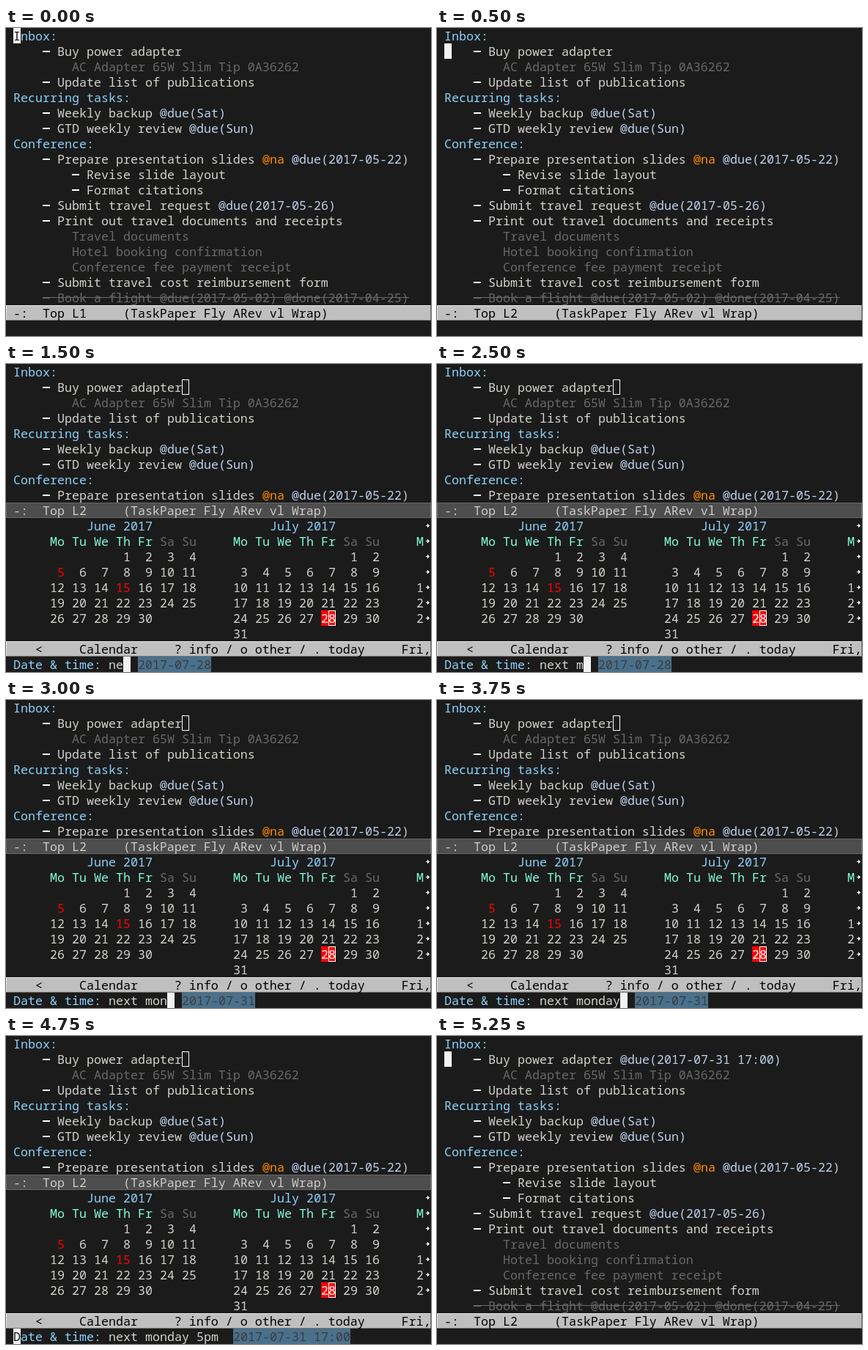
Write an HTML page with a canvas that moves like this. It is 580 by 420 pixels and loops after 5500 ms.

```html
<!DOCTYPE html>
<html lang="en">
<head>
<meta charset="utf-8">
<title>Task list with date prompt</title>
<style>
html, body { margin: 0; width: 100%; height: 100%; overflow: hidden; background: #1b1b1b; }
canvas { display: block; width: 580px; height: 420px; }
</style>
</head>
<body>
<canvas id="stage" width="580" height="420"></canvas>
<script>
const ctx = document.getElementById('stage').getContext('2d');
const W = 580, H = 420, CELL = 10, ROW = 21, LEFT = 10;
const STEP = 250, LOOP = 5500;
const C = {
  bg: '#1b1b1b', text: '#d3d2cb', head: '#8bd2fc', tag: '#bcd2ee', next: '#ff8c00',
  dim: '#696969', white: '#ffffff', cursor: '#f2f2f2', day: '#7fffd4', red: '#ff0000',
  hint: '#4a708b', hintText: '#393d40'
};
const TYPED = 'next monday 5pm';
const PROMPT = 'Date & time: ';

const TASKS = [
  ['head', 'Inbox:'],
  ['task', 'Buy power adapter'],
  ['note', 'AC Adapter 65W Slim Tip 0A36262'],
  ['task', 'Update list of publications'],
  ['head', 'Recurring tasks:'],
  ['task', 'Weekly backup @due(Sat)'],
  ['task', 'GTD weekly review @due(Sun)'],
  ['head', 'Conference:'],
  ['task', 'Prepare presentation slides @na @due(2017-05-22)'],
  ['sub', 'Revise slide layout'],
  ['sub', 'Format citations'],
  ['task', 'Submit travel request @due(2017-05-26)'],
  ['task', 'Print out travel documents and receipts'],
  ['note', 'Travel documents'],
  ['note', 'Hotel booking confirmation'],
  ['note', 'Conference fee payment receipt'],
  ['task', 'Submit travel cost reimbursement form'],
  ['done', 'Book a flight @due(2017-05-02) @done(2017-04-25)']
];

function rect(x, y, w, h, color) {
  ctx.fillStyle = color;
  ctx.fillRect(x, y, w, h);
}

// Columns count from the left edge of the text area.
function write(str, col, row, color) {
  ctx.fillStyle = color;
  ctx.fillText(str, LEFT + col * CELL, row * ROW + 17);
}

function block(col, row, ch = '') {
  rect(LEFT + col * CELL, row * ROW, CELL, ROW, C.cursor);
  write(ch, col, row, C.bg);
}

function hollow(col, row) {
  ctx.strokeStyle = C.white;
  ctx.lineWidth = 1;
  ctx.strokeRect(LEFT + col * CELL + 0.5, row * ROW + 0.5, CELL - 1, ROW - 1);
}

function dash(col, row, color) {
  rect(LEFT + col * CELL, row * ROW + 10, CELL, 2, color);
}

function tagged(str, col, row) {
  for (const part of str.split(/(@na|@due\([^)]*\))/)) {
    const color = part === '@na' ? C.next : part[0] === '@' ? C.tag : C.text;
    write(part, col, row, color);
    col += part.length;
  }
}

function taskLine([kind, str], row) {
  if (kind === 'head') write(str, 0, row, C.head);
  else if (kind === 'note') write(str, 8, row, C.dim);
  else if (kind === 'done') {
    dash(4, row, C.dim);
    write(str, 6, row, C.dim);
    rect(LEFT + 40, row * ROW + 10, (str.length + 2) * CELL, 1, C.dim);
  } else {
    const col = kind === 'sub' ? 8 : 4;
    dash(col, row, C.white);
    tagged(str, col + 2, row);
  }
}

function tasks(count, due) {
  TASKS.slice(0, count).forEach((line, row) => {
    taskLine(row === 1 ? [line[0], line[1] + due] : line, row);
  });
}

function modeline(str, row, active) {
  const y = row * ROW;
  const [light, dark, face, ink] = active
    ? ['#e5e5e5', '#727272', '#bfbfbf', '#000000']
    : ['#666666', '#666666', '#4d4d4d', '#cccccc'];
  rect(0, y, W, ROW, dark);
  rect(0, y, W - 1, ROW - 1, light);
  rect(1, y + 1, W - 2, ROW - 2, face);
  write(str, -1, row, ink);
}

function status(line, row, active) {
  modeline(` -:  Top L${line}     (TaskPaper Fly ARev vl Wrap)`, row, active);
}

function month(title, col, first, days, holidays) {
  write(title, col + 5, 10, C.head);
  ['Mo', 'Tu', 'We', 'Th', 'Fr', 'Sa', 'Su'].forEach((name, i) => {
    write(name, col + i * 3, 11, i < 5 ? C.day : C.dim);
  });
  for (let d = 1; d <= days; d++) {
    const slot = first + d - 1;
    const color = holidays.includes(d) ? C.red : C.text;
    write(String(d).padStart(2), col + slot % 7 * 3, 12 + Math.floor(slot / 7), color);
  }
}

function arrow(row) {
  const y = row * ROW + 10;
  rect(573, y, 5, 1, C.white);
  rect(575, y - 1, 2, 3, C.white);
  rect(575, y - 2, 1, 5, C.white);
}

function calendar() {
  month('June 2017', 5, 3, 30, [5, 15]);
  month('July 2017', 30, 5, 31, []);
  rect(LEFT + 420, 16 * ROW, 2 * CELL, ROW, C.red);
  write('28', 42, 16, C.white);
  hollow(43, 16);
  write('M', 55, 11, C.day);
  ['1', '2', '2'].forEach((digit, i) => write(digit, 55, 14 + i, C.text));
  for (let row = 10; row < 17; row++) arrow(row);
  modeline('    <     Calendar     ? info / o other / . today     Fri,', 18, true);
}

function parsedDate(input) {
  if (input === TYPED) return '2017-07-31 17:00';
  return /^next mon(day.*)?$/.test(input) ? '2017-07-31' : '2017-07-28';
}

function prompt(input) {
  const end = PROMPT.length + input.length;
  const date = parsedDate(input);
  write(PROMPT, 0, 19, C.head);
  write(input, PROMPT.length, 19, C.text);
  rect(LEFT + (end + 2) * CELL, 19 * ROW, date.length * CELL, ROW, C.hint);
  write(date, end + 2, 19, C.hintText);
  if (input === TYPED) block(0, 19, 'D');
  else block(end, 19);
}

function listView(step) {
  tasks(18, step >= 20 ? ' @due(2017-07-31 17:00)' : '');
  status(step < 2 ? 1 : 2, 18, true);
  if (step < 2) block(0, 0, 'I');
  else if (step === 3) block(23, 1);
  else if (step === 20) block(46, 1);
  else block(0, 1);
}

function promptView(input) {
  tasks(9, '');
  hollow(23, 1);
  status(2, 9, false);
  calendar();
  prompt(input);
}

function draw(now) {
  const step = Math.floor(now % LOOP / STEP);
  rect(0, 0, W, H, C.bg);
  ctx.font = '500 16.667px "Noto Sans Mono", "DejaVu Sans Mono", monospace';
  ctx.textBaseline = 'alphabetic';
  if (step >= 4 && step < 20) promptView(TYPED.slice(0, step - 4));
  else listView(step);
}

const start = performance.now();
function tick() {
  draw(performance.now() - start);
  requestAnimationFrame(tick);
}
tick();
</script>
</body>
</html>
```
